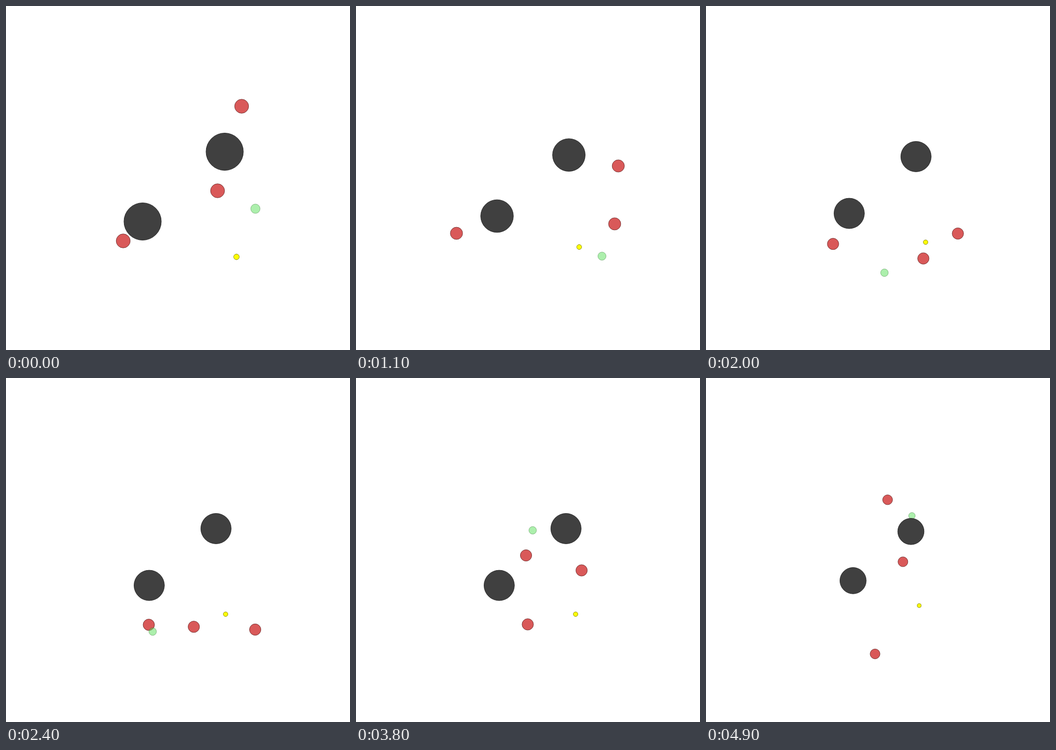
An HTML page with a canvas that plays this animation: 700 by 700 pixels, repeating every 5000 ms.

```html
<!DOCTYPE html>
<html lang="en">
<head>
<meta charset="utf-8">
<title>Pursuit</title>
<style>
html, body { margin: 0; width: 100%; height: 100%; overflow: hidden; background: #fff; }
canvas { display: block; }
</style>
</head>
<body>
<canvas id="stage" width="700" height="700"></canvas>
<script>
const ctx = document.getElementById('stage').getContext('2d');
const HALF = 350, UNIT = 190, STEPS = 50, STEP_MS = 100;

// Turning points of the chase, from the stage centre at zoom 1, at these shared steps
const times = [0, 6, 11, 16, 18, 24, 31, 38, 47, 49];
const chasers = [
  [[-111.5, 128], [-160, 127], [-166.3, 128.6], [-136.5, 148], [-129, 153],
   [-73, 187], [-65, 136], [-0.6, 186], [-5, 306.6], [-8.5, 300]],
  [[129.5, -146], [197, -119], [209.9, -28], [206.6, 61.7], [203, 99],
   [193, 199], [176.4, 137], [134, 51], [88, 21], [72, 34]],
  [[80.5, 26], [133, 52], [201.5, 106.7], [179.6, 176.6], [150, 194],
   [39.5, 192], [-14.8, 127.2], [-4.9, 13.5], [23, -136], [27.7, -145]]
];
const runner =
  [[157.5, 62.5], [181, 94], [172, 181.7], [101.2, 229.3], [62, 239.7],
   [-63.3, 204], [-40.6, 108.8], [11.7, -49.2], [119, -109], [98, -98.8]];

const rocks = [[95, -53.5], [-72, 88.5]];
const food = [119, 160.5];

const span = i => times[i + 1] - times[i];
const slope = (path, i, d) => (path[i + 1][d] - path[i][d]) / span(i);

function tangent(path, i, d) {
  if (i === 0) return 0; // everyone starts at rest
  if (i === path.length - 1) return slope(path, i - 1, d);
  const a = span(i - 1), b = span(i);
  return (b * slope(path, i - 1, d) + a * slope(path, i, d)) / (a + b);
}

function along(path, step) {
  const i = times.findIndex((t, n) => step <= times[n + 1]);
  const h = span(i), u = (step - times[i]) / h, v = 1 - u;
  return [0, 1].map(d =>
    v * v * (1 + 2 * u) * path[i][d] + u * u * (1 + 2 * v) * path[i + 1][d] +
    h * u * v * (v * tangent(path, i, d) - u * tangent(path, i + 1, d)));
}

// The camera only zooms out: its range is the farthest reach so far plus one unit
function simulate() {
  let reach = HALF / UNIT - 1;
  return Array.from({ length: STEPS }, (_, step) => {
    const reds = chasers.map(path => along(path, step));
    const green = along(runner, step);
    reach = Math.max(reach, ...[...reds, green].flat().map(c => Math.abs(c) / UNIT));
    return { reds, green, zoom: HALF / (1 + reach) / UNIT };
  });
}

function disc([x, y], size, [r, g, b], zoom, alpha = 1) {
  ctx.beginPath();
  ctx.arc(HALF + x * zoom, HALF + y * zoom, size * UNIT * zoom, 0, 2 * Math.PI);
  ctx.fillStyle = `rgba(${r},${g},${b},${alpha})`;
  ctx.fill();
  ctx.strokeStyle = `rgba(${r >> 1},${g >> 1},${b >> 1},${alpha * 0.9})`;
  ctx.stroke();
}

const poses = simulate();

function draw(now) {
  const { reds, green, zoom } = poses[Math.floor(now / STEP_MS) % STEPS];
  ctx.fillStyle = '#fff';
  ctx.fillRect(0, 0, 2 * HALF, 2 * HALF);
  ctx.lineWidth = 1;
  reds.forEach(p => disc(p, 0.075, [217, 89, 89], zoom));
  disc(green, 0.05, [89, 223, 89], zoom, 0.5);
  rocks.forEach(p => disc(p, 0.2, [64, 64, 64], zoom));
  disc(food, 0.03, [255, 255, 0], zoom);
}

let start;
function tick(now) {
  start ??= now;
  draw(Math.max(0, now - start));
  requestAnimationFrame(tick);
}
draw(0);
requestAnimationFrame(tick);
</script>
</body>
</html>
```
